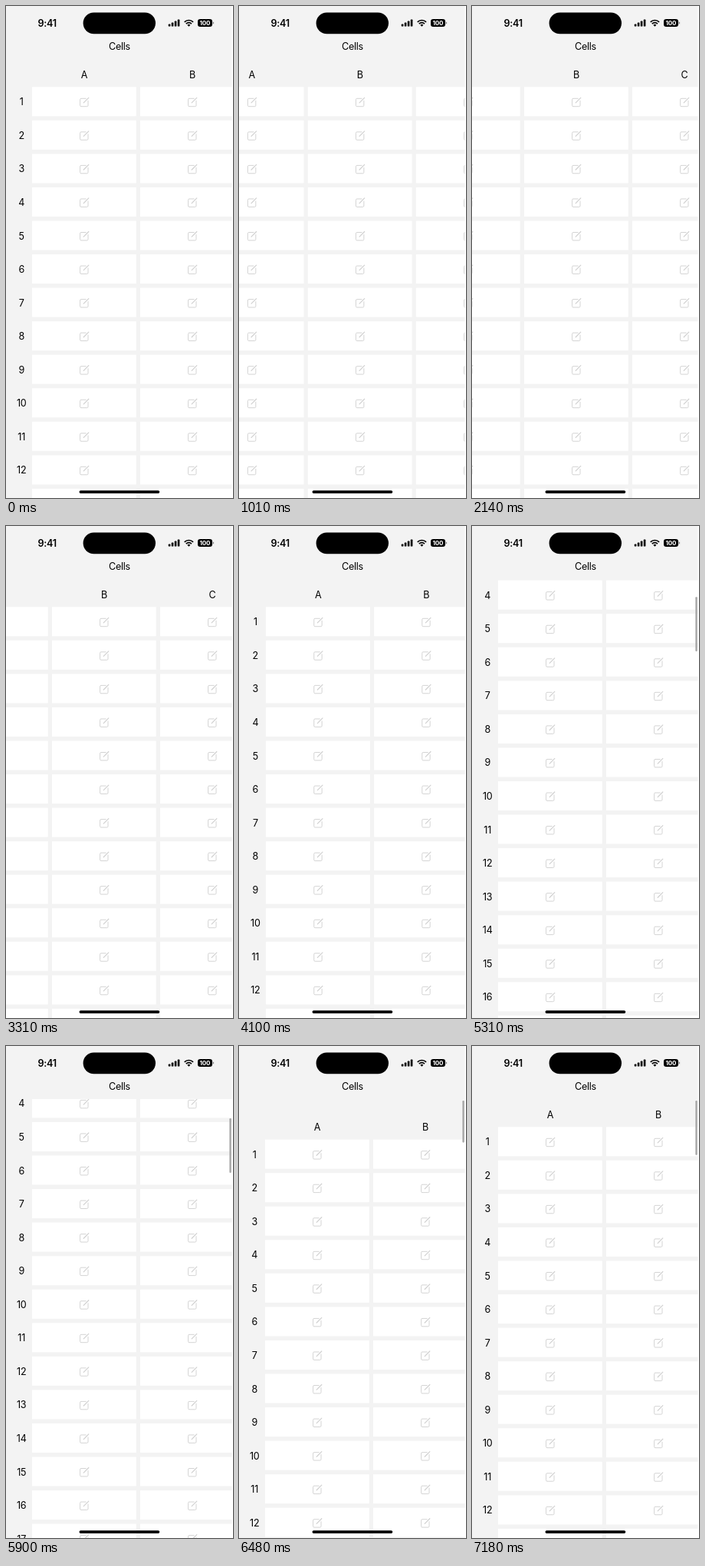
An HTML page for the animation above (8000 ms loop, 296x640 px).

```html
<!DOCTYPE html>
<html lang="en">
<head>
<meta charset="utf-8">
<title>Cells</title>
<style>
  html, body { margin: 0; width: 100%; height: 100%; overflow: hidden; background: #f3f3f3; }
  svg { display: block; width: 296px; height: 640px; }
  text { font: 12.6px Inter, "Liberation Sans", sans-serif; text-anchor: middle; letter-spacing: -.25px; }
  .clock { font-weight: 600; }
  .level { font-size: 8px; font-weight: 700; fill: #fff; letter-spacing: -.2px; }
  .arc { fill: none; stroke: #000; stroke-width: 1.6; }
</style>
</head>
<body>
<svg viewBox="0 0 296 640">
  <defs>
    <clipPath id="view"><rect y="69" width="296" height="571"/></clipPath>
    <g id="edit" fill="none" stroke="#d0d0d0" stroke-width=".9" stroke-linecap="round" stroke-linejoin="round">
      <path d="M2.2-4.4H-4Q-5.4-4.4-5.4-3V4.6Q-5.4 6-4 6H3.6Q5 6 5 4.6V-1.4"/>
      <path d="M-.8 1.2L5.8-5.4" stroke-width="1.2"/>
    </g>
  </defs>
  <rect width="296" height="640" fill="#f3f3f3"/>
  <g clip-path="url(#view)">
    <g id="sheet"></g>
    <rect id="bar" x="291.4" width="2.3" rx="1.15" fill="#a3a3a3"/>
  </g>
  <rect x="294.5" width="1.5" height="640" fill="#fff"/>
  <text x="148" y="56.6">Cells</text>
  <text class="clock" x="53.6" y="26.6">9:41</text>
  <rect x="100.6" y="8.4" width="94.4" height="27.9" rx="13.95"/>
  <g id="signal"></g>
  <path class="arc" d="M232.7 20.9A8.1 8.1 0 0 1 244.1 20.9"/>
  <path class="arc" d="M234.8 23.1A5.1 5.1 0 0 1 242 23.1"/>
  <path d="M238.4 26.8L236.4 24.8A2.9 2.9 0 0 1 240.4 24.8Z"/>
  <rect x="250" y="17" width="19" height="10" rx="3.2"/>
  <path d="M269.8 20.3Q271.2 20.8 271.2 22T269.8 23.7Z" fill="#777"/>
  <text class="level" x="259.4" y="25">100</text>
  <rect x="95.5" y="630.2" width="104.8" height="3.8" rx="1.9"/>
</svg>
<script>
const LOOP = 8000;
const COL = 141, ROW = 43.55;
const BAR_SHOWN = 4830;

const drag = p => 1 - (1 - p) ** 2;
const swing = p => (1 - Math.cos(Math.PI * p)) / 2;
const flick = p => p ** 3;
const settle = p => 1 - (1 - p) ** 3;

// Each gesture advances in a number of equal, held steps.
const move = (start, end, steps, from, to, ease) => ({ start, end, steps, from, to, ease });

const across = [
  move(500, 1350, 5, 2, 101, drag),
  move(2140, 3310, 1, 107, 115, drag),
  move(3310, 3710, 3, 115, -18, swing),
  move(3710, 4360, 5, -18, 0, settle)
];
const down = [
  move(4830, 5740, 6, 4, 219, drag),
  move(5740, 6060, 2, 210, -26, flick),
  move(6210, 7180, 7, -26, 0, settle)
];

const $ = id => document.getElementById(id);

function add(parent, tag, attrs, label) {
  const el = document.createElementNS("http://www.w3.org/2000/svg", tag);
  for (const key in attrs) el.setAttribute(key, attrs[key]);
  if (label !== undefined) el.textContent = label;
  parent.append(el);
}

function buildSheet() {
  const sheet = $("sheet");
  for (let r = 0; r < 20; r++) {
    const y = 124.7 + r * ROW;
    add(sheet, "text", { x: 20.2, y: y + 4.6 }, r + 1);
    for (let c = 0; c < 3; c++) {
      const x = 102 + c * COL;
      add(sheet, "rect", { x: x - 68, y: y - 19.4, width: 135.7, height: 38, fill: "#fff" });
      add(sheet, "use", { href: "#edit", x, y });
    }
  }
  [..."ABC"].forEach((name, c) => add(sheet, "text", { x: 102 + c * COL, y: 93.5 }, name));
}

function buildSignal() {
  for (let i = 0; i < 4; i++) {
    const height = 3 + 2 * i;
    add($("signal"), "rect", { x: 211.8 + i * 4, y: 26.6 - height, width: 2.6, height, rx: .7 });
  }
}

function offset(moves, t) {
  const m = moves.findLast(m => t >= m.start);
  if (!m) return 0;
  const step = Math.floor(m.steps * (t - m.start) / (m.end - m.start));
  return m.from + (m.to - m.from) * m.ease(Math.min(1, step / m.steps));
}

function draw(t) {
  const x = offset(across, t), y = offset(down, t), bar = $("bar");
  $("sheet").setAttribute("transform", `translate(${-x} ${-y})`);
  bar.setAttribute("visibility", t >= BAR_SHOWN ? "visible" : "hidden");
  bar.setAttribute("y", 71 + Math.max(0, y) * .128);
  bar.setAttribute("height", 71 + Math.min(0, y));
}

buildSheet();
buildSignal();
draw(0);

let origin;
requestAnimationFrame(function tick(now) {
  origin ??= now;
  draw((now - origin) % LOOP);
  requestAnimationFrame(tick);
});
</script>
</body>
</html>
```
